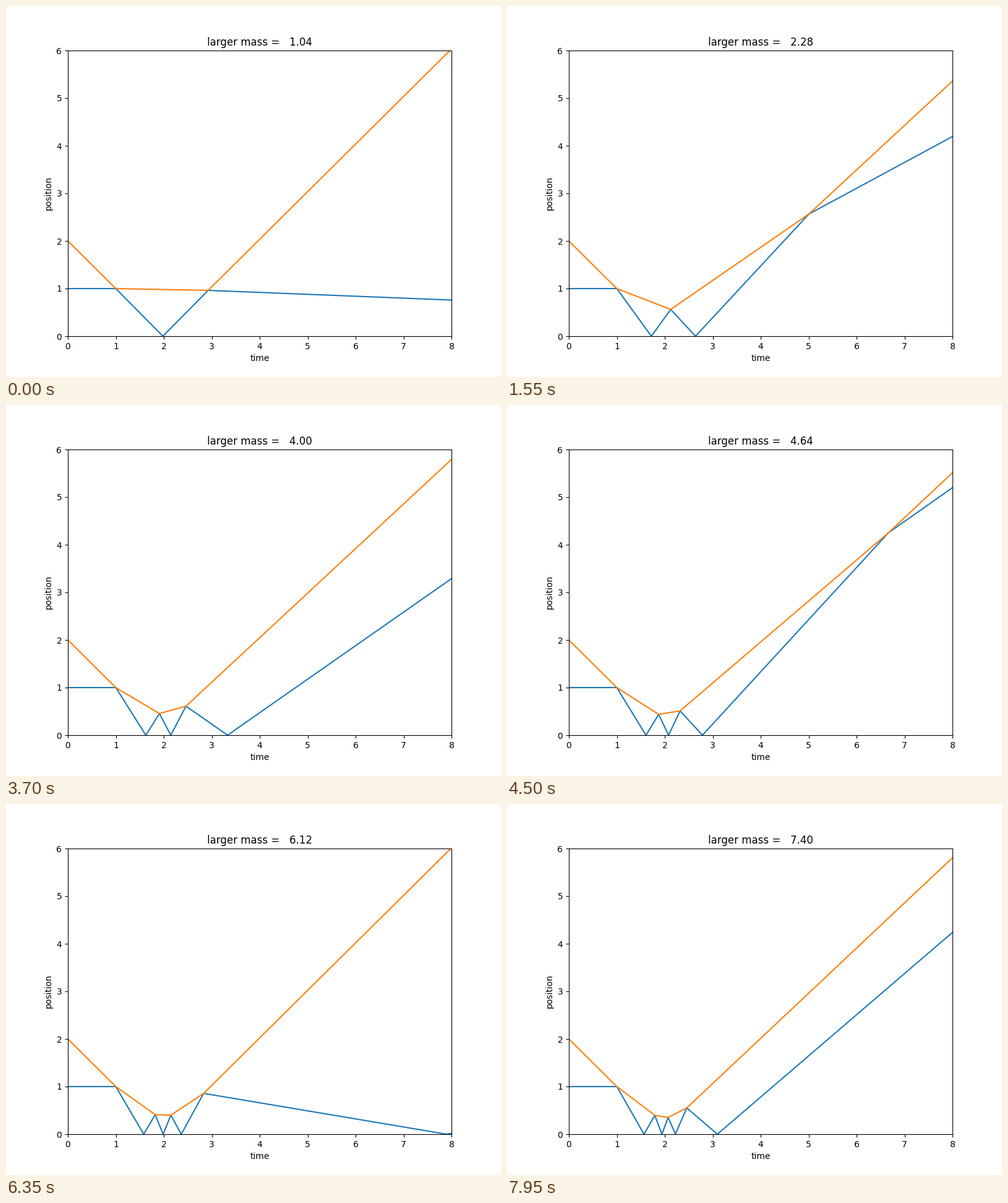
A matplotlib script that plays this animation: 800 by 600 pixels, repeating every 8 s.

```python
import matplotlib.pyplot as plt
from matplotlib.animation import FuncAnimation

FRAMES = 160
INTERVAL = 50
T_END = 8.0
FIRST_MASS = 1.04
MASS_STEP = 0.04


def trajectories(mass):
    """Event points of a unit mass between a wall at 0 and a larger mass."""
    t, x, y = 0.0, 1.0, 2.0
    u, v = 0.0, -1.0
    ts, xs, ys = [t], [x], [y]
    while t < T_END:
        left = T_END - t
        wall = -x / u if u < 0 else left
        hit = (y - x) / (u - v) if u > v else left
        dt = min(wall, hit, left)
        t += dt
        x += u * dt
        y += v * dt
        if dt == left:
            t = T_END
        elif dt == wall:
            x, u = 0.0, -u
        else:
            y = x
            centre = (u + mass * v) / (1 + mass)
            u, v = 2 * centre - u, 2 * centre - v
        ts.append(t)
        xs.append(x)
        ys.append(y)
    return ts, xs, ys


fig, ax = plt.subplots(figsize=(8, 6), dpi=100)
small, = ax.plot([], [], color="C0", lw=1.5)
large, = ax.plot([], [], color="C1", lw=1.5)
ax.set_xlim(0, T_END)
ax.set_ylim(0, 6)
ax.set_xlabel("time")
ax.set_ylabel("position")
title = ax.set_title("")


def update(frame):
    mass = FIRST_MASS + MASS_STEP * frame
    ts, xs, ys = trajectories(mass)
    small.set_data(ts, xs)
    large.set_data(ts, ys)
    title.set_text(f"larger mass = {mass:6.2f}")
    return small, large, title


anim = FuncAnimation(fig, update, frames=FRAMES, interval=INTERVAL,
                     repeat=True, repeat_delay=0, blit=False)
plt.show()
```
